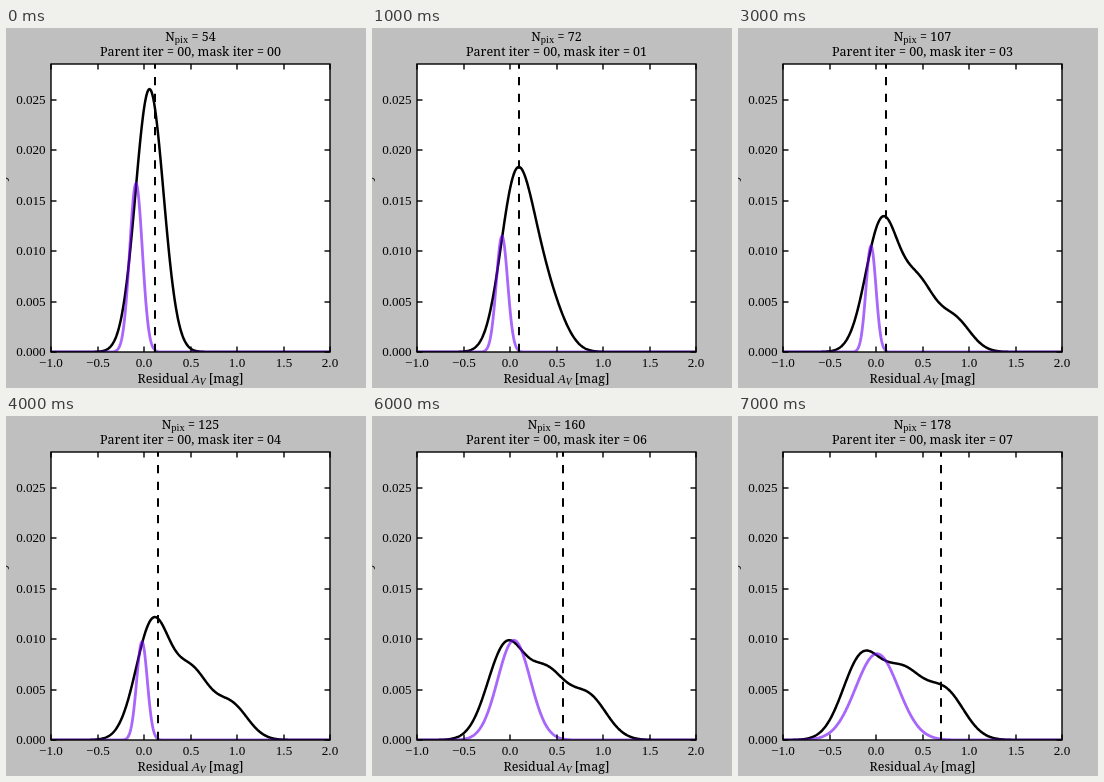
Animation of 360x360 px, one loop 8000 ms. Source, as an HTML page with a canvas:

```html
<!DOCTYPE html>
<html lang="en">
<head>
<meta charset="utf-8">
<title>Residual distribution</title>
<style>
  html, body { margin: 0; width: 100%; height: 100%; overflow: hidden; background: #bfbfbf; }
  canvas { display: block; }
</style>
</head>
<body>
<canvas id="stage" width="360" height="360"></canvas>
<script>
const ctx = document.getElementById('stage').getContext('2d');
const BOX = { left: 45, top: 36, right: 324, bottom: 324 };
const MID = (BOX.left + BOX.right) / 2;
const STEP_MS = 1000;
const STEPS = 8;
const UNIT_X = 93;
const UNIT_Y = 10100;
const AREA = 3680;
const DASH = 100 / 12;

const SERIF = '"Noto Serif", serif';
const MATH = '"Liberation Serif", serif';
const TEXT = `12.5px ${SERIF}`;
const DIGITS = `13.1px ${MATH}`;

// Key poses; the steps between them are interpolated.
const KEYS = [
  { step: 0, peak: 143.5, fit: 130, cut: 149 },
  { step: 2, peak: 141, fit: 130, cut: 144 },
  { step: 4, peak: 147, fit: 136, cut: 152 },
  { step: 5, peak: 144, fit: 145, cut: 179 },
  { step: 7, peak: 124, fit: 139, cut: 203 }
];

function poseAt(step) {
  const next = Math.max(1, KEYS.findIndex(key => key.step >= step));
  const a = KEYS[next - 1], b = KEYS[next];
  const t = (step - a.step) / (b.step - a.step);
  const mix = name => a[name] + (b[name] - a[name]) * t;
  return { peak: mix('peak'), fit: mix('fit'), cut: Math.round(mix('cut')) };
}

const bell = (x, centre, sigma) => Math.exp(-0.5 * ((x - centre) / sigma) ** 2);

// Three fading bells drift apart and widen while their total area stays fixed.
function densityAt(step, peak) {
  const sigma = 14 + 0.75 * step;
  const gap = 42 * (1 - Math.exp(-0.65 * step));
  const ratio = 0.44 + 0.0065 * step ** 2;
  const height = AREA / (sigma * (1 + ratio + ratio ** 2));
  return x => height * [0, 1, 2].reduce(
    (sum, k) => sum + ratio ** k * bell(x, peak + k * gap, sigma), 0);
}

function line(x1, y1, x2, y2) {
  ctx.beginPath();
  ctx.moveTo(x1, y1);
  ctx.lineTo(x2, y2);
  ctx.stroke();
}

function curve(heightAt, color, width) {
  ctx.beginPath();
  for (let x = BOX.left; x <= BOX.right; x += 0.5) ctx.lineTo(x, BOX.bottom - heightAt(x));
  ctx.strokeStyle = color;
  ctx.lineWidth = width;
  ctx.stroke();
}

function label(text, x, y, font, align = 'center') {
  ctx.font = font;
  ctx.textAlign = align;
  ctx.fillText(text, x, y);
}

// Centres a row of [text, font, drop] runs.
function richLabel(runs, x, y) {
  const widths = runs.map(([text, font]) => {
    ctx.font = font;
    return ctx.measureText(text).width;
  });
  x -= widths.reduce((a, b) => a + b) / 2;
  runs.forEach(([text, font, drop = 0], i) => {
    label(text, x, y + drop, font, 'left');
    x += widths[i];
  });
}

function drawAxes() {
  const { left, top, right, bottom } = BOX;
  const size = 5.5;
  ctx.strokeStyle = ctx.fillStyle = '#000';
  ctx.lineWidth = 1.4;
  ctx.strokeRect(left, top, right - left, bottom - top);
  for (let i = 0; i <= 6; i++) {
    const x = Math.round(left + i * UNIT_X / 2);
    line(x, bottom, x, bottom - size);
    line(x, top, x, top + size);
    label((i / 2 - 1).toFixed(1).replace('-', '−'), x, 338.6, DIGITS);
  }
  for (let i = 0; i <= 5; i++) {
    const value = i * 0.005;
    const y = Math.round(bottom - value * UNIT_Y);
    line(left, y, left + size, y);
    line(right, y, right - size, y);
    label(value.toFixed(3), 39.6, y + 4, DIGITS, 'right');
  }
  richLabel([
    ['Residual ', TEXT],
    ['A', `italic 13px ${MATH}`],
    ['V', `italic 9.5px ${MATH}`, 2],
    [' [mag]', TEXT]
  ], MID, 355);

  ctx.save();
  ctx.translate(-0.3, 180);
  ctx.rotate(-Math.PI / 2);
  label('Probability', 0, 0, TEXT);
  ctx.restore();
}

function drawTitle(step) {
  richLabel([
    ['N', TEXT],
    ['pix', `10.5px ${MATH}`, 2],
    [` = ${Math.round(54 + 17.7 * step)}`, TEXT]
  ], MID, 13);
  label(`Parent iter = 00, mask iter = 0${step}`, MID, 28, TEXT);
}

function drawCurves(step) {
  const { peak, fit, cut } = poseAt(step);
  const density = densityAt(step, peak);
  const fitHeight = 1.02 * density(fit);
  const fitSigma = (cut - fit) / 3;
  curve(density, '#000', 2.5);
  curve(x => fitHeight * bell(x, fit, fitSigma), 'rgba(110, 0, 247, 0.6)', 2.8);

  ctx.strokeStyle = '#000';
  ctx.lineWidth = 2;
  ctx.setLineDash([DASH, DASH]);
  line(cut, BOX.bottom, cut, BOX.top);
}

function draw(step) {
  const { left, top, right, bottom } = BOX;
  const frame = [left, top, right - left, bottom - top];
  ctx.fillStyle = '#bfbfbf';
  ctx.fillRect(0, 0, 360, 360);
  ctx.fillStyle = '#fff';
  ctx.fillRect(...frame);

  ctx.save();
  ctx.beginPath();
  ctx.rect(...frame);
  ctx.clip();
  drawCurves(step);
  ctx.restore();

  drawAxes();
  drawTitle(step);
}

const start = performance.now();
function tick() {
  const elapsed = Math.max(0, performance.now() - start);
  draw(Math.floor(elapsed / STEP_MS) % STEPS);
  requestAnimationFrame(tick);
}
tick();
</script>
</body>
</html>
```
